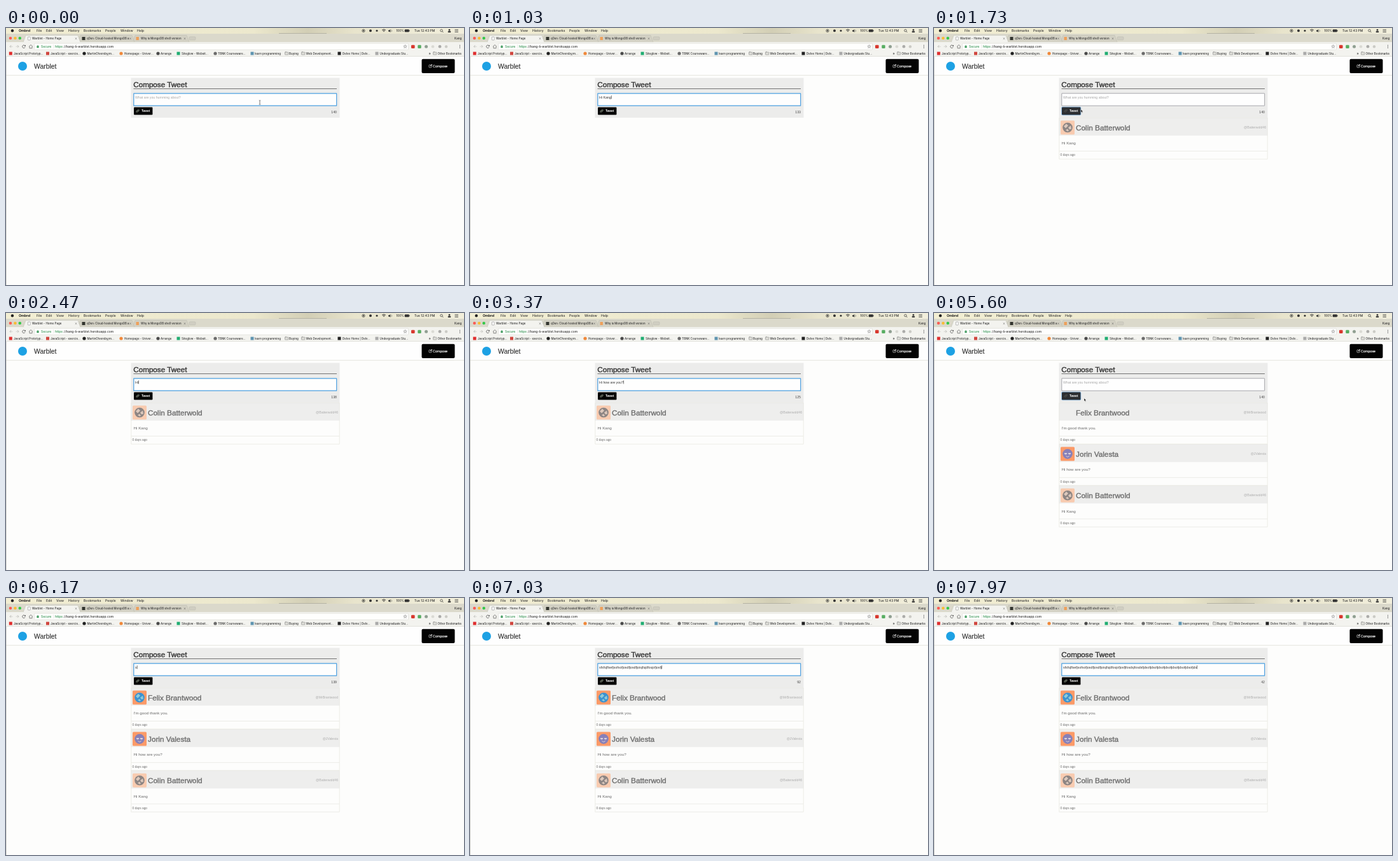
These frames come from a looping animation (720x404 px, 8 s). An HTML page with a canvas:

```html
<!DOCTYPE html>
<html lang="en">
<head>
<meta charset="utf-8">
<title>Warblet - Home Page</title>
<style>
html, body { margin: 0; width: 100%; height: 100%; overflow: hidden; background: #fdfdfc; }
canvas { display: block; width: 100vw; height: 100vh; }
</style>
</head>
<body>
<canvas id="stage"></canvas>
<script>
const W = 720, H = 404, LOOP = 8000;
const canvas = document.getElementById('stage');
const ctx = canvas.getContext('2d');
const UI = 'Inter, sans-serif', PAGE = '"Liberation Sans", Arial, sans-serif';
const PAPER = '#fdfdfc', CARD = '#ececeb', INK = '#333333', GREY = '#707070', RULE = '#e6e6df';

const mash = ('sfsfsjflsefjsofsofjosdfjosdfjoisjfsjdfosjofjosfjfosdsjfosdsf' + 'jdsofjdsof'.repeat(4)).slice(0, 98);

// focus: field clicked, start to end: typing, post: message appears
const drafts = [
  { text: 'Hi Kang', focus: 0, start: 650, end: 1080, post: 1570, name: 'Colin Batterwold', handle: '@Batterwold46', face: 0 },
  { text: 'Hi how are you?', focus: 2180, start: 2350, end: 3280, post: 3680, name: 'Jorin Valesta', handle: '@JValesta', face: 1 },
  { text: "I'm good thank you.", focus: 4060, start: 4160, end: 5130, post: 5560, name: 'Felix Brantwood', handle: '@MrBrantwood', face: 2 },
  { text: mash, focus: 6050, start: 6155, end: 7970, post: Infinity }
];
const REPLY = 90, LEAD = 300;

// Pointer path: time, x, y
const path = [
  [0, 399, 117], [1270, 399, 117], [1470, 231, 128], [1770, 231, 128], [2150, 262, 113],
  [3380, 262, 113], [3570, 230, 131], [3770, 230, 131], [4040, 266, 113], [5260, 266, 113],
  [5450, 229, 131], [5540, 229, 131], [5600, 236, 134], [5750, 236, 134], [6030, 270, 113]
];

function rect(x, y, w, h, fill) {
  ctx.fillStyle = fill;
  ctx.fillRect(x, y, w, h);
}
function box(x, y, w, h, r, fill, stroke, lw = 0.6) {
  ctx.beginPath();
  ctx.roundRect(x, y, w, h, r);
  if (fill) { ctx.fillStyle = fill; ctx.fill(); }
  if (stroke) { ctx.strokeStyle = stroke; ctx.lineWidth = lw; ctx.stroke(); }
}
function dot(x, y, r, fill) {
  ctx.beginPath();
  ctx.arc(x, y, r, 0, 7);
  ctx.fillStyle = fill;
  ctx.fill();
}
function ring(x, y, r, color, lw = 0.6, from = 0, to = 7) {
  ctx.beginPath();
  ctx.arc(x, y, r, from, to);
  ctx.strokeStyle = color;
  ctx.lineWidth = lw;
  ctx.stroke();
}
function line(points, color, lw = 0.6) {
  ctx.beginPath();
  for (let i = 0; i < points.length; i += 2) ctx.lineTo(points[i], points[i + 1]);
  ctx.strokeStyle = color;
  ctx.lineWidth = lw;
  ctx.stroke();
}
function shape(points, fill) {
  ctx.beginPath();
  for (let i = 0; i < points.length; i += 2) ctx.lineTo(points[i], points[i + 1]);
  ctx.closePath();
  ctx.fillStyle = fill;
  ctx.fill();
}
function text(s, x, y, size, color = INK, { font = PAGE, weight = 400, align = 'left', bold = 0 } = {}) {
  ctx.font = `${weight} ${size}px ${font}`;
  ctx.textAlign = align;
  ctx.fillStyle = color;
  ctx.fillText(s, x, y);
  if (bold) {
    ctx.strokeStyle = color;
    ctx.lineWidth = bold;
    ctx.strokeText(s, x, y);
  }
}
function label(s, x, y, size = 4.5, color = INK, weight = 500) {
  text(s, x, y, size, color, { font: UI, weight });
}
function cross(x, y, r, color) {
  line([x - r, y - r, x + r, y + r], color, 0.5);
  line([x + r, y - r, x - r, y + r], color, 0.5);
}

function menuBar() {
  const g = ctx.createLinearGradient(0, 0, W, 0);
  g.addColorStop(0, '#f2eed3');
  g.addColorStop(0.54, '#ece8cd');
  g.addColorStop(0.66, '#d2ceb5');
  g.addColorStop(0.76, '#e8e4cc');
  g.addColorStop(1, '#f2efdc');
  rect(0, 0, W, 9, g);
  rect(429, 8, 75, 1.2, '#b5b3a4');
  dot(10, 4.2, 2.2, '#222');
  label('Ombrel', 20, 6.2, 5.2, '#1c1c1c', 700);
  const items = [['File', 48], ['Edit', 63], ['View', 79], ['History', 98], ['Bookmarks', 122],
    ['People', 156], ['Window', 180], ['Help', 206]];
  for (const [s, x] of items) label(s, x, 6.2, 5.1);
  ring(562, 4.3, 2.2, INK, 0.7);
  dot(562, 4.3, 1.1, INK);
  dot(573, 4.3, 2, INK);
  dot(583, 4.3, 1.5, INK);
  for (const r of [1.5, 3, 4.5]) ring(594, 6.6, r, INK, 0.8, -2.3, -0.85);
  shape([601, 3.4, 602.5, 3.4, 604.3, 2, 604.3, 6.8, 602.5, 5.4, 601, 5.4], INK);
  ring(604, 4.4, 2.4, INK, 0.5, -0.8, 0.8);
  label('100%', 613.5, 6.1, 4.5);
  box(627, 2.6, 6.5, 3.5, 0.6, INK, INK);
  rect(634, 3.6, 0.7, 1.5, INK);
  label('Tue 12:43 PM', 642, 6.2, 5);
  ring(684.5, 4, 1.8, INK, 0.7);
  line([685.8, 5.3, 687.5, 7], INK, 0.8);
  dot(697, 3.2, 1.4, INK);
  rect(694.8, 5, 4.4, 2, INK);
  for (let i = 0; i < 3; i++) rect(705.5, 2.2 + i * 1.9, 5.5, 0.7, INK);
}

function tab(x, w, fill) {
  const p = [x, 22.4, x + 4, 11.6, x + w - 4, 11.6, x + w, 22.4];
  shape(p, fill);
  line(p, '#b9b8ac', 0.5);
}

function tabStrip() {
  rect(0, 9, W, 13.5, '#dbd9cb');
  ['#fa5d55', '#f8bc34', '#36c84b'].forEach((c, i) => dot(7 + i * 7.4, 16, 2.3, c));
  tab(199, 89, '#d3d1c4');
  tab(113, 89, '#d3d1c4');
  tab(27, 90, '#f3f3ef');
  box(34.5, 14, 3.6, 5, 0.3, '#fff', '#777', 0.5);
  rect(119.5, 14, 5, 5, '#33352f');
  rect(204.5, 14, 4.4, 5, '#eea05a');
  label('Warblet - Home Page', 41, 18.4, 4.55);
  label('qDen: Cloud-hosted MongoDB a', 127, 18.4, 4.3);
  label('Why is MongoDB shell version', 212, 18.4, 4.4);
  for (const x of [110, 195.5, 281]) cross(x, 16.6, 1.3, '#555');
  box(288, 13.8, 10, 5, 1.5, '#d0cec2', '#b3b1a6', 0.4);
  label('Kang', 705, 17.6, 4.6);
}

function star(x, y, r) {
  const p = [];
  for (let i = 0; i <= 10; i++) {
    const a = -Math.PI / 2 + i * Math.PI / 5, q = i % 2 ? r * 0.42 : r;
    p.push(x + q * Math.cos(a), y + q * Math.sin(a));
  }
  line(p, '#666', 0.5);
}

function toolbar() {
  rect(0, 22.3, W, 22.5, '#f3f3ef');
  const pale = '#b8b8b4', mid = '#595959', green = '#2f9150';
  line([10.5, 29.2, 6, 29.2, 8, 27.2, 6, 29.2, 8, 31.2], pale);
  line([15.5, 29.2, 20, 29.2, 18, 27.2, 20, 29.2, 18, 31.2], pale);
  ring(28, 29.2, 2.3, mid, 0.8, 0.4, 5.6);
  shape([30.8, 26.4, 30.8, 29, 28.4, 28.6], mid);
  line([36, 29.2, 39, 26.5, 42, 29.2], mid, 0.7);
  line([37, 29, 37, 31.8, 41, 31.8, 41, 29], mid, 0.7);
  box(44.5, 24.2, 588, 10, 1, '#fefefd', '#d3d3cc', 0.5);
  ring(50, 28.4, 1.1, green, 0.6, Math.PI, 6.3);
  rect(48.4, 28.4, 3.2, 2.6, green);
  label('Secure', 55, 31, 4.9, green);
  rect(74.4, 26, 0.4, 6, '#cfcfca');
  label('https', 77, 31, 4.9, green);
  label('://kang-li-warblet.herokuapp.com', 89.8, 31, 4.9);
  star(627.5, 29.2, 2.8);
  box(637, 26.8, 5.6, 5.2, 1.2, '#d8382e');
  box(647.3, 26.8, 5.4, 5.2, 1.2, '#58ad62');
  dot(660.6, 29.2, 2.5, '#90a092');
  dot(671, 29.2, 2.3, '#dadad4');
  dot(682, 29.2, 2.4, '#acacaa');
  dot(692, 29.2, 2.2, '#cbcbc6');
  for (let i = 0; i < 3; i++) dot(713.5, 27.2 + i * 2, 0.6, mid);
}

function folder(x) {
  box(x - 2.5, 38, 5.4, 4, 0.4, '#deded8', '#777', 0.5);
  line([x - 2.5, 38, x - 1.8, 37.3, x, 37.3], '#777', 0.5);
}

function bookmarks() {
  // icon x, icon colour ('' = folder), square?, label, label x
  const marks = [
    [7.3, '#e02f2f', 1, 'JavaScript Prototyp...', 12], [65.5, '#d0463e', 1, 'JavaScript - exercis...', 70],
    [123, '#222', 0, 'MartinOlversby/m...', 127.5], [181, '#f0883a', 0, 'Homepage - Univer...', 186],
    [239, '#4a4a4a', 0, 'Arrange', 243], [271, '#20ad72', 1, 'Siteglow - Websit...', 276],
    [329, '#6b6b6b', 0, 'TBNK Courseware...', 333], [387, '#5f94b0', 1, 'learn programming', 391],
    [441, '', 0, 'Buying', 445], [467, '', 0, 'Web Development...', 471.5],
    [524, '#222', 1, 'Delve Home | Delv...', 529], [583, '#aaa', 1, 'Undergraduate Stu...', 587.5],
    [674, '', 0, 'Other Bookmarks', 678.5]
  ];
  for (const [x, color, square, s, tx] of marks) {
    if (!color) folder(x);
    else if (square) rect(x - 2.5, 37.5, 5, 5, color);
    else dot(x, 40, 2.6, color);
    label(s, tx, 41.6, 4.5);
  }
  label('»', 664.5, 41.6, 5.5);
  rect(0, 44.3, W, 0.8, '#dcdcd3');
}

function siteHeader() {
  rect(0, 45, W, 29, '#fefefe');
  rect(0, 73.8, W, 1, RULE);
  dot(26, 60, 7, '#1da1e4');
  text('Warblet', 44, 63.7, 10.4, INK, { bold: 0.15 });
  box(653.5, 48.8, 52, 22.2, 2, '#030303');
  box(665, 58, 4, 4, 0.6, null, '#fff', 0.6);
  line([667, 60, 670, 57], '#fff', 1);
  text('Compose', 671, 61.8, 5.4, '#fff', { bold: 0.15 });
}

function composer(t, typed, focused, hover) {
  const lit = !focused || hover;
  rect(196.5, 78.5, 328, 62.5, CARD);
  text('Compose Tweet', 200.3, 93, 11.65, '#3a3a3a', { bold: 0.45 });
  rect(200.5, 95.2, 319.5, 0.8, '#555');
  box(200.8, 102.8, 318.9, 19.4, 0.3, '#fefefe', focused ? '#4a9fe0' : '#85858c', focused ? 1.2 : 0.7);
  if (typed) text(typed, 203, 110.6, 5.25, INK);
  else text('What are you humming about?', 203, 110.6, 5.25, '#a6a6a6');
  if (focused && (typed || t % 1000 > 500)) {
    ctx.font = `400 5.25px ${PAGE}`;
    rect(203.2 + ctx.measureText(typed).width, 106, 0.6, 5.5, '#222');
  }
  if (!focused) box(200.2, 123.8, 31, 13.4, 1.8, '#86bbea');
  box(201, 124.5, 29.4, 12, 1.2, lit ? '#2c2e31' : '#030303');
  ctx.save();
  ctx.translate(207, 130.4);
  ctx.rotate(-0.65);
  ctx.beginPath();
  ctx.ellipse(0, 0, 3.2, 1.7, 0, 0, 7);
  ctx.fillStyle = lit ? '#484a48' : '#5c6257';
  ctx.fill();
  ctx.restore();
  line([204, 133, 208.5, 129.5], '#1b1b1b', 0.5);
  text('Tweet', 213, 132.2, 4.8, '#fff', { weight: 700 });
  text(String(140 - typed.length), 520, 133.5, 5.25, '#444', { align: 'right' });
}

function avatar(kind, y) {
  const [bg, disc, tint] = [
    ['#f8cbb0', '#8d8583', '#dcc8bc'],
    ['#fb9a68', '#8780b8', '#e0d8de'],
    ['#fb9a68', '#3c92d0', '#8fcbd8']
  ][kind];
  box(199, y, 22, 22, 1.6, bg);
  const cx = 210, cy = y + 11;
  dot(cx, cy, 7.8, disc);
  if (kind === 1) {
    for (const s of [-1, 1]) {
      dot(cx + s * 3, cy - 1.2, 2.1, tint);
      rect(cx + s * 3 - 2.2, cy - 3.5, 4.4, 2, disc);
    }
    ring(cx, cy + 2, 2.6, tint, 0.9, 0.3, 2.8);
  } else {
    shape([cx - 6, cy - 2, cx - 2, cy - 6, cx + 1, cy - 3, cx - 3, cy + 1], tint);
    shape([cx + 1, cy, cx + 5, cy - 3, cx + 6, cy + 2, cx + 3, cy + 3], tint);
    shape([cx - 3, cy + 4, cx, cy + 2, cx + 2, cy + 5, cx, cy + 6], tint);
  }
}

function post(d, y, age) {
  rect(196.5, y, 328, 65.2, PAPER);
  rect(196.5, y, 328, 28.4, '#eeeeed');
  box(196.8, y + 0.3, 327.4, 65, 0, null, RULE, 0.7);
  if (age > 100) avatar(d.face, y + 4.7);
  text(d.name, 223, y + 20.2, 11.75, GREY, { bold: 0.4 });
  text(d.handle, 522, y + 17.3, 5.1, '#adadad', { align: 'right' });
  text(d.text, 200.5, y + 42.5, 6.25, '#686868');
  rect(197, y + 52.5, 327, 0.7, RULE);
  text('0 days ago', 198.5, y + 60.6, 4.8, '#686868');
}

function pointerAt(t) {
  let i = 0;
  while (i < path.length - 1 && path[i + 1][0] <= t) i++;
  const a = path[i], b = path[i + 1] || a;
  const u = b === a ? 0 : (t - a[0]) / (b[0] - a[0]);
  const e = u * u * (3 - 2 * u);
  return [a[1] + (b[1] - a[1]) * e, a[2] + (b[2] - a[2]) * e];
}

function pointer(x, y) {
  if (x > 201 && x < 520 && y > 102 && y < 122.5) {
    const c = '#555';
    line([x, y - 3, x, y + 3], c, 0.8);
    line([x - 1.3, y - 3.2, x + 1.3, y - 3.2], c, 0.6);
    line([x - 1.3, y + 3.2, x + 1.3, y + 3.2], c, 0.6);
  } else {
    const p = [0, 0, 0, 4.6, 1.1, 3.6, 1.9, 5.4, 2.6, 5, 1.8, 3.4, 3.2, 3.3].map((v, i) => v + (i % 2 ? y : x));
    shape(p, '#111');
    line([...p, x, y], '#fff', 0.35);
  }
}

function draw(t) {
  rect(0, 0, W, H, PAPER);
  menuBar();
  tabStrip();
  toolbar();
  bookmarks();
  siteHeader();

  const draft = drafts.find(d => t < d.post);
  const share = Math.min(1, Math.max(0, (t - draft.start) / (draft.end - draft.start)));
  const typed = draft.text.slice(0, Math.ceil(share * draft.text.length));
  const focused = t >= draft.focus && t < draft.post - REPLY;
  const [px, py] = pointerAt(t);
  const hover = px > 201 && px < 231 && py > 124 && py < 137;

  composer(t, typed, focused, hover);
  drafts.filter(d => t >= d.post).reverse().forEach((d, i) => post(d, 140.8 + i * 65.1, t - d.post));
  rect(0, 45, 0.6, H - 45, '#bdbdb8');

  // Typing hides the pointer until the mouse moves again
  if (t < draft.start || t > draft.post - LEAD) pointer(px, py);
}

function resize() {
  const k = window.devicePixelRatio || 1;
  canvas.width = Math.round(innerWidth * k);
  canvas.height = Math.round(innerHeight * k);
}
addEventListener('resize', resize);
resize();

const begin = performance.now();
function tick() {
  ctx.setTransform(canvas.width / W, 0, 0, canvas.height / H, 0, 0);
  draw((performance.now() - begin) % LOOP);
  requestAnimationFrame(tick);
}
tick();
</script>
</body>
</html>
```
